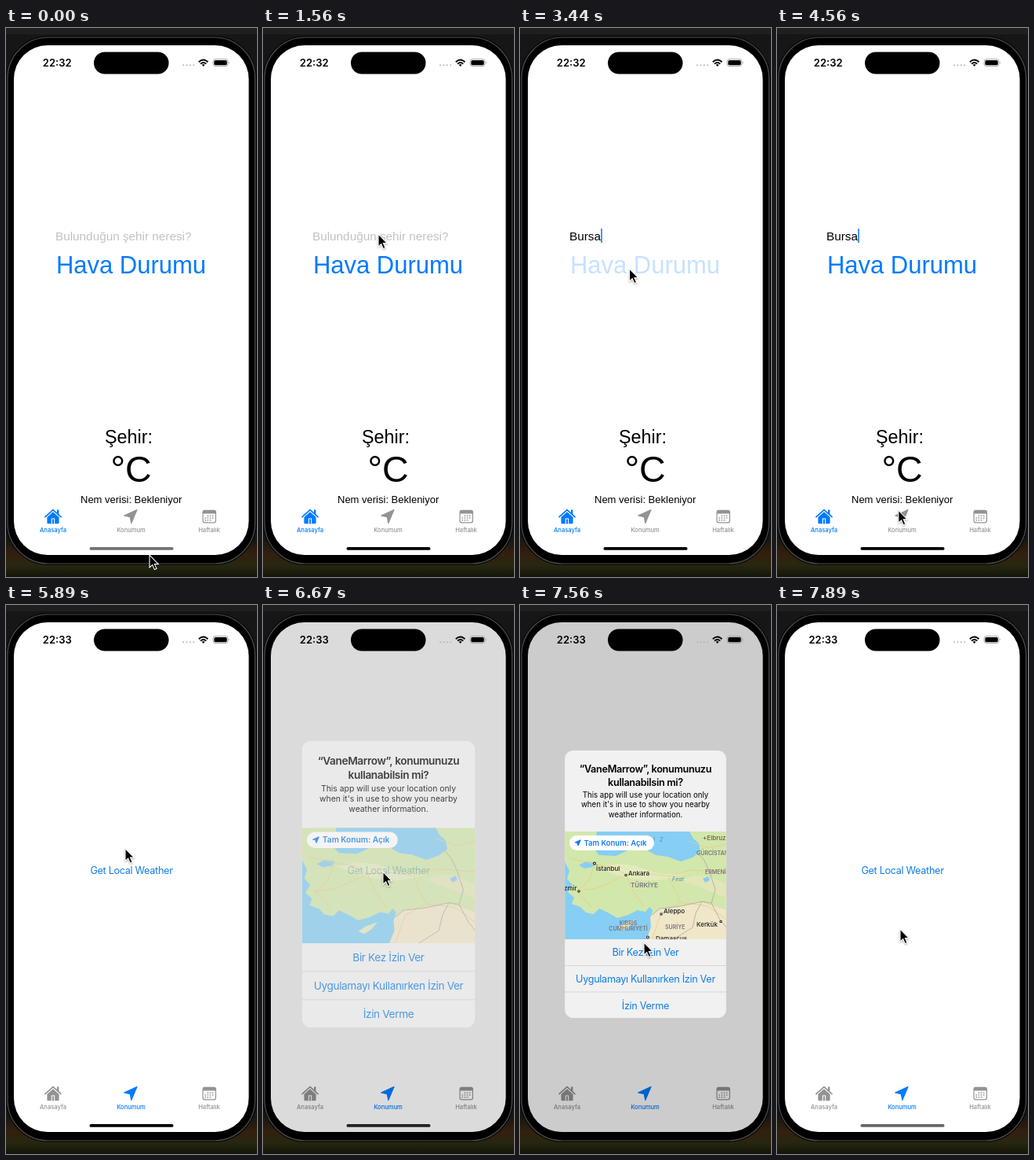
An HTML page for the animation above (8 s loop, 320 by 698 pixels).

```html
<!DOCTYPE html>
<html lang="tr">
<head>
<meta charset="utf-8">
<style>
html, body { margin: 0; height: 100%; overflow: hidden; background: #111; }
svg { display: block; width: 100vw; height: 100vh; font-family: Inter, "Open Sans", sans-serif; }
.helv { font-family: "Liberation Sans", Arial, sans-serif; }
.mid { text-anchor: middle; }
.btn { font-size: 12.7px; letter-spacing: -.33px; fill: #107ee8; text-anchor: middle; }
.tab { color: #939396; fill: currentColor; font-size: 7.6px; font-weight: 500; text-anchor: middle; }
.tab.on { color: #007aff; }
.city { font-size: 8px; font-weight: 500; fill: #222; }
.land { font-size: 7px; font-weight: 600; fill: #7d7182; }
</style>
</head>
<body>
<svg viewBox="0 0 320 698" preserveAspectRatio="none">
  <defs>
    <linearGradient id="ground" x2="0" y2="1">
      <stop offset="0" stop-color="#181611"/><stop offset=".4" stop-color="#33200e"/>
      <stop offset=".7" stop-color="#27270f"/><stop offset="1" stop-color="#14150a"/>
    </linearGradient>
    <clipPath id="card"><rect x="57.2" y="185" width="205.6" height="340" rx="10.7"/></clipPath>
    <clipPath id="mapBox"><rect x="57.2" y="288" width="205.6" height="137"/></clipPath>
    <path id="arrow" d="M167 612.5 150.7 620 158.3 621.7 159.8 629.6Z" stroke-width="1.2" stroke-linejoin="round"/>
  </defs>

  <!-- desktop and phone body -->
  <rect width="320" height="698" fill="#161616"/>
  <rect width="320" height="8" fill="#1f1f1f"/>
  <rect y="650" width="320" height="48" fill="url(#ground)"/>
  <rect x="1" y="11" width="317.5" height="671" rx="53" fill="#222" stroke="#0a0a0a" stroke-width="2"/>
  <rect x="2" y="12" width="315.5" height="669" rx="52" fill="#000" stroke="#4d4d4d" stroke-width="1.2"/>
  <rect x="10" y="22" width="299.5" height="648" rx="43" fill="#fff"/>

  <!-- first tab -->
  <g id="home">
    <text id="hint" class="helv" x="63" y="269.5" font-size="15.3" fill="#c2c2c4">Bulunduğun şehir neresi?</text>
    <text id="typed" class="helv" x="63" y="269.5" font-size="15.3"></text>
    <rect id="caret" y="255" width="1.6" height="18" fill="#1a7cff"/>
    <text id="title" class="helv mid" x="159.5" y="311.5" font-size="31" fill="#007aff">Hava Durumu</text>
    <text class="helv" x="126" y="528" font-size="23.3">Şehir:</text>
    <text class="helv" x="133.5" y="576.5" font-size="46.5">°C</text>
    <text class="helv" x="95" y="604" font-size="13">Nem verisi: Bekleniyor</text>
  </g>

  <!-- second tab -->
  <text id="local" class="btn" x="160" y="341.8">Get Local Weather</text>

  <!-- tab bar -->
  <g id="tab0" class="tab">
    <path d="M50 621.6 60 612.6 70 621.6" fill="none" stroke="currentColor" stroke-width="1.7" stroke-linecap="round" stroke-linejoin="round"/>
    <path d="M65 612.5H67.4V619L65 617ZM52.4 622 60 615.2 67.6 622V629Q67.6 630.2 66.4 630.2H53.6Q52.4 630.2 52.4 629Z"/>
    <path d="M57.8 630.2V623.4H62.2V630.2Z" fill="#fff"/>
    <path d="M58.9 630.2V624.4H61.1V630.2Z"/>
    <text x="60" y="641">Anasayfa</text>
  </g>
  <g id="tab1" class="tab">
    <use href="#arrow" stroke="currentColor"/>
    <text x="159.5" y="641">Konumum</text>
  </g>
  <g id="tab2" class="tab">
    <rect x="251" y="613.3" width="16.4" height="15.6" rx="2.4" fill="none" stroke="currentColor" stroke-width="1.2"/>
    <path d="M251 617.5V615.5Q251 613.3 253.4 613.3H265Q267.4 613.3 267.4 615.5V617.5Z"/>
    <path d="M256.6 620.3H266M253.4 623H266M253.4 625.8H263" stroke="currentColor" stroke-width="1.5" stroke-dasharray="1.6 1.5"/>
    <text x="259" y="641">Haftalık</text>
  </g>
  <rect id="bar" x="106.5" y="660" width="107" height="3.8" rx="1.9"/>

  <rect id="dim" x="10" y="22" width="299.5" height="648" rx="43"/>

  <!-- status bar -->
  <text id="clock" y="49" font-size="13" font-weight="600"></text>
  <rect x="112" y="30.5" width="95.5" height="28" rx="14"/>
  <path d="M226 47.3H240" stroke="#b4b4b4" stroke-width="2" stroke-dasharray="0 4.4" stroke-linecap="round"/>
  <g fill="none" stroke="#000" stroke-width="1.9">
    <path d="M245.8 43.2Q251.6 37.8 257.4 43.2M248 45.6Q251.6 42.2 255.2 45.6"/>
    <path d="M249.7 46.8Q251.6 45.3 253.5 46.8L251.6 48.9Z" fill="#000" stroke="none"/>
  </g>
  <rect x="264" y="39.6" width="19" height="9" rx="3" fill="none" stroke="#a0a0a0" stroke-width=".9"/>
  <rect x="265.3" y="40.9" width="16.4" height="6.4" rx="1.9"/>
  <path d="M284.4 42.6Q286 44.1 284.4 45.6Z" fill="#a0a0a0"/>

  <!-- permission alert -->
  <g id="alert"><g clip-path="url(#card)">
    <rect x="57" y="185" width="206" height="340" fill="#f1f1f1"/>
    <g class="mid" font-size="12.7" font-weight="600" letter-spacing="-.33">
      <text x="160" y="213">“VaneMarrow”, konumunuzu</text>
      <text x="160" y="230">kullanabilsin mi?</text>
    </g>
    <g class="mid" font-size="9.7">
      <text x="160" y="245.3">This app will use your location only</text>
      <text x="160" y="257.5">when it's in use to show you nearby</text>
      <text x="160" y="269.6">weather information.</text>
    </g>
    <g clip-path="url(#mapBox)">
      <rect x="57" y="288" width="206" height="137" fill="#d2e7ab"/>
      <path d="M166 397 178 386 204 383 232 378 263 388V425H160Z" fill="#efe7c8"/>
      <path d="M98 334Q130 324 160 336T215 338Q190 352 160 350T98 334Z" fill="#e2ebbd"/>
      <path d="M205 350Q232 336 263 356V372Q232 360 205 350Z" fill="#e3e6b8"/>
      <g fill="#86cef3">
        <path d="M57 326 63 338 60 348 67 356 61 365 69 372 66 380 77 384 84 391 94 393 101 386 112 391 124 398 138 394 150 388 160 390 165 384 169 388 166 398 167 410 161 425H57Z"/>
        <path d="M98 288H216L221 297 228 303 230 313 220 321 205 326 188 320 173 318 157 309 140 311 122 319 101 318 94 310Z"/>
        <path d="M75 331 84 326 96 328 93 333 82 335Z"/>
        <path d="M233 348 240 345 242 350 236 353Z"/>
      </g>
      <path d="M124 411 133 405 147 400 139 409 131 414Z" fill="#e3e9b8"/>
      <g fill="none" stroke="#f0c987" stroke-width=".8">
        <path d="M64 322 95 330 118 333 135 343 160 341 190 345 218 337 263 340M135 343 143 362 158 384M72 364 98 360 135 343M180 392 205 378 240 383 263 400M180 392 168 425M95 330 88 350 72 364 92 384M190 345 198 365 205 378M215 300 240 309 263 304"/>
      </g>
      <path d="M168 394 178 386 204 383 232 377 244 379 249 362 242 340 235 325 226 314M196 425 220 410 224 392 232 377M244 379 255 400 263 410" fill="none" stroke="#b3a4a6" stroke-width=".8"/>
      <g id="labels">
        <g fill="#fff" stroke="#222" stroke-width="1.1">
          <circle cx="95" cy="328.6" r="1.5"/><circle cx="135" cy="343.5" r="1.2"/><circle cx="180" cy="393" r="1.2"/>
          <circle cx="163" cy="422.5" r="1.5"/><circle cx="256" cy="402.5" r="1.2"/><circle cx="75" cy="364" r="1.2"/>
        </g>
        <g class="city">
          <text x="97" y="338.5">İstanbul</text><text x="138" y="344">Ankara</text>
          <text x="56" y="363.5">zmir</text><text x="183" y="392.5">Aleppo</text>
          <text x="225" y="408.7">Kerkük</text><text x="173" y="427">Damascus</text>
          <text x="233" y="299" fill="#6b5a45">+Elbruz</text>
        </g>
        <g class="land">
          <text x="141" y="359.3" font-size="8">TÜRKİYE</text><text x="225" y="317.7">GÜRCİSTAN</text>
          <text x="236" y="342">ERMENİSTAN</text><text x="185" y="412">SURİYE</text>
          <text class="mid" x="138" y="407">KIBRIS</text><text class="mid" x="138" y="414.3">CUMHURİYETİ</text>
        </g>
        <g font-size="7" font-style="italic" fill="#4c8fb8">
          <text x="194" y="351">Fırat</text><text x="170" y="302">İ</text><text x="178" y="301">Z</text>
        </g>
      </g>
      <rect x="63" y="293" width="108" height="19" rx="9.5" fill="#fff"/>
      <g fill="#0f7cf0">
        <use href="#arrow" transform="translate(-5.5 -8) scale(.5)" />
        <path d="M77 298.3 69 302 72.7 302.8 73.5 306.6Z"/>
        <text x="81.5" y="306" font-size="9.5" font-weight="600">Tam Konum: Açık</text>
      </g>
    </g>
    <path d="M57 458.5H263M57 492H263" stroke="#cbcbcb" stroke-width=".7"/>
    <text class="btn" x="160" y="446">Bir Kez İzin Ver</text>
    <text class="btn" x="160" y="480">Uygulamayı Kullanırken İzin Ver</text>
    <text class="btn" x="160" y="513.8">İzin Verme</text>
  </g></g>

  <path id="cursor" d="M0 0V16L3.7 12.6 6.3 18.6 9 17.4 6.4 11.6H11.3Z" stroke="#fff" stroke-width="1.1"
    style="filter: drop-shadow(0 1px 1px #0005)"/>
</svg>
<script>
const LOOP = 8000, $ = id => document.getElementById(id);
const set = (id, name, value) => $(id).setAttribute(name, value);
const show = (id, on) => set(id, 'opacity', +on);

// Eased value from rows of [time, value]
function at(keys, t) {
  let i = keys.findIndex(k => k[0] > t);
  if (i < 0) return keys[keys.length - 1][1];
  if (!i) return keys[0][1];
  const [t0, a] = keys[i - 1], [t1, b] = keys[i];
  const u = (t - t0) / (t1 - t0);
  return a + (b - a) * u * u * (3 - 2 * u);
}

const curX = [[0, 183], [1000, 147], [2950, 147], [3400, 139.5], [3750, 139.5], [4720, 156],
  [5150, 156], [5880, 152], [6780, 153], [7330, 158], [7600, 158], [7890, 157]];
const curY = [[0, 670], [1000, 262], [2950, 262], [3400, 306], [3750, 306], [4720, 637],
  [5150, 637], [5880, 309.5], [5940, 309.5], [6220, 338], [6650, 339], [6780, 342],
  [7330, 429], [7600, 429], [7890, 412]];
const barAlpha = [[0, .55], [850, .55], [1220, 1], [6560, 1], [7000, 0], [7640, 0], [7890, .6]];
const titleAlpha = [[3220, 1], [3330, .22], [3560, .22], [4300, 1]];
const keyTimes = [2110, 2330, 2440, 2560, 2780];
const caretSpans = [[800, 1560], [1890, 3840], [4340, 4780]];

function draw(t) {
  const local = t >= 5110;
  show('home', !local);
  show('local', local);
  set('tab0', 'class', local ? 'tab' : 'tab on');
  set('tab1', 'class', local ? 'tab on' : 'tab');
  $('clock').textContent = local ? '22:33' : '22:32';
  set('clock', 'x', t >= 7780 ? 40.5 : 46.8);

  const typed = $('typed');
  typed.textContent = 'Bursa'.slice(0, keyTimes.filter(k => t >= k).length);
  show('hint', !typed.textContent);
  set('caret', 'x', 63.2 + typed.getComputedTextLength());
  show('caret', caretSpans.some(([a, b]) => t >= a && t < b));
  set('title', 'opacity', at(titleAlpha, t));
  set('bar', 'opacity', at(barAlpha, t));

  const enter = t < 6500 ? 0 : 1 - Math.exp((6500 - t) / 142);
  const shown = enter * at([[7580, 1], [7880, 0]], t);
  set('dim', 'opacity', .2 * shown);
  set('alert', 'opacity', shown);
  set('alert', 'transform', `translate(160 355) scale(${1 + .24 * (1 - enter)}) translate(-160 -355)`);
  set('labels', 'opacity', at([[6900, 0], [7100, 1]], t));

  set('cursor', 'transform', `translate(${at(curX, t)} ${at(curY, t)})`);
}

function frame() {
  draw(performance.now() % LOOP);
  requestAnimationFrame(frame);
}
frame();
</script>
</body>
</html>
```
